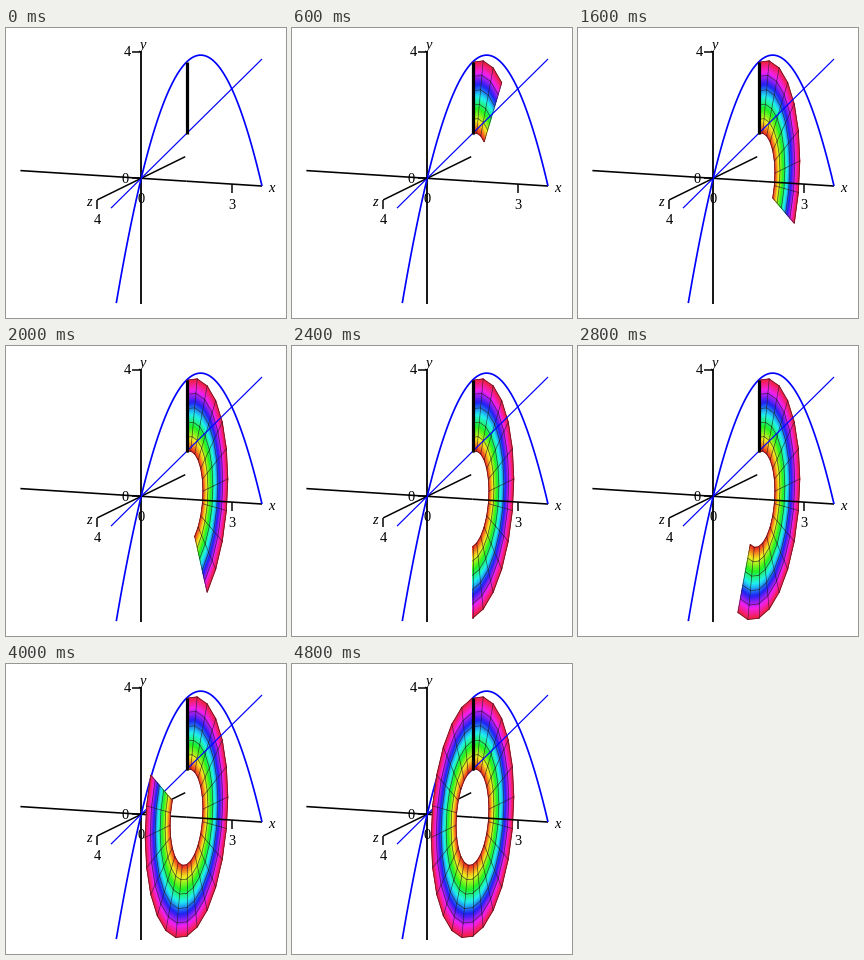
A matplotlib script for the animation above (5 s loop, 280 by 290 pixels).

```python
import numpy as np
import matplotlib.pyplot as plt
from matplotlib.animation import FuncAnimation
from matplotlib.colors import ListedColormap, hsv_to_rgb

W, H, DPI = 280, 290, 72
SECTORS = 24
RINGS = 5
X0 = 1.5                      # where the slice is revolved
R_IN, R_OUT = X0, 4 * X0 - X0 ** 2
BLUE = "#0000ff"

BEHIND, SURFACE, MESH, FRONT = 1, 2, 3, 4


def project(x, y, z):
    """Oblique view of space in stage pixels."""
    px = 135.2 + 30.2 * x - 11.0 * z
    py = 150.3 + 1.93 * x - 31.75 * y + 5.4 * z
    return px, py


def polar(r, angle):
    return project(X0, r * np.cos(angle), -r * np.sin(angle))


fig = plt.figure(figsize=(W / DPI, H / DPI), dpi=DPI, facecolor="white")
ax = fig.add_axes([0, 0, 1, 1])
ax.set_xlim(0, W)
ax.set_ylim(H, 0)
ax.axis("off")


def stroke(x, y, z, color, width, order):
    return ax.plot(*project(x, y, z), color=color, lw=width, zorder=order,
                   solid_capstyle="butt")[0]


def tick(x, y, dx, dy):
    ax.plot([x, x + dx], [y, y + dy], color="black", lw=1.5, zorder=FRONT,
            solid_capstyle="butt")


def label(x, y, text, style="normal"):
    ax.text(x, y, text, family="Liberation Serif", size=14.5, style=style,
            ha="center", va="center_baseline", zorder=FRONT)


def draw_axes():
    zero = np.zeros(2)
    stroke(np.array([-4, X0]), zero, zero, "black", 1.6, BEHIND)
    stroke(np.array([X0, 4]), zero, zero, "black", 1.6, FRONT)
    stroke(zero, np.array([-3.96, 4]), zero, "black", 1.8, BEHIND)
    stroke(zero, zero, np.array([-4, 4]), "black", 1.5, BEHIND)

    tick(126, 23.5, 9, 0)
    tick(126, 150.3, 9, 0)
    tick(225.8, 156, 0, 9)
    tick(91.3, 172, 0, 9)
    for x, y, text in [(121, 23.5, "4"), (119.5, 150, "0"), (135, 170, "0"),
                       (225.5, 176, "3"), (91, 191.5, "4")]:
        label(x, y, text)
    for x, y, text in [(265, 158.5, "x"), (136.5, 16.5, "y"), (82.5, 173, "z")]:
        label(x, y, text, "italic")


def draw_curves():
    for lo, hi, order in [(-1, X0, BEHIND), (X0, 4, FRONT)]:
        x = np.linspace(lo, hi, 80)
        stroke(x, x, 0 * x, BLUE, 1.2, order)
        x = np.linspace(max(lo, -0.825), hi, 80)
        stroke(x, 4 * x - x ** 2, 0 * x, BLUE, 1.7, order)
    stroke(np.full(2, X0), np.array([R_IN, R_OUT]), np.zeros(2),
           "black", 3.2, FRONT + 1)


hues = np.linspace(0, 0.98, 256)
rainbow = ListedColormap(hsv_to_rgb(
    np.column_stack([hues, np.full(256, 0.87), np.full(256, 0.95)])))


def make_sector(index):
    """One flat-edged wedge of the washer with its mesh lines."""
    angles = 2 * np.pi * np.array([index, index + 1]) / SECTORS
    radii = np.linspace(R_IN, R_OUT, 41)
    r, a = np.meshgrid(radii, angles)
    parts = [ax.pcolormesh(*polar(r, a), (r - R_IN) / (R_OUT - R_IN),
                           cmap=rainbow, vmin=0, vmax=1, shading="gouraud",
                           zorder=SURFACE)]
    line = dict(color="#201820", lw=0.7, alpha=0.75, zorder=MESH)
    for ring in np.linspace(R_IN, R_OUT, RINGS + 1):
        parts += ax.plot(*polar(ring, angles), **line)
    spokes = angles if index == 0 else angles[1:]
    for spoke in spokes:
        parts += ax.plot(*polar(np.array([R_IN, R_OUT]), spoke), **line)
    return parts


draw_axes()
draw_curves()
sectors = [make_sector(i) for i in range(SECTORS)]
ax.set_xlim(0, W)
ax.set_ylim(H, 0)


def update(frame):
    for i, parts in enumerate(sectors):
        for part in parts:
            part.set_visible(i < frame)
    return []


anim = FuncAnimation(fig, update, frames=SECTORS + 1, interval=200,
                     repeat=True, repeat_delay=0)
plt.show()
```
